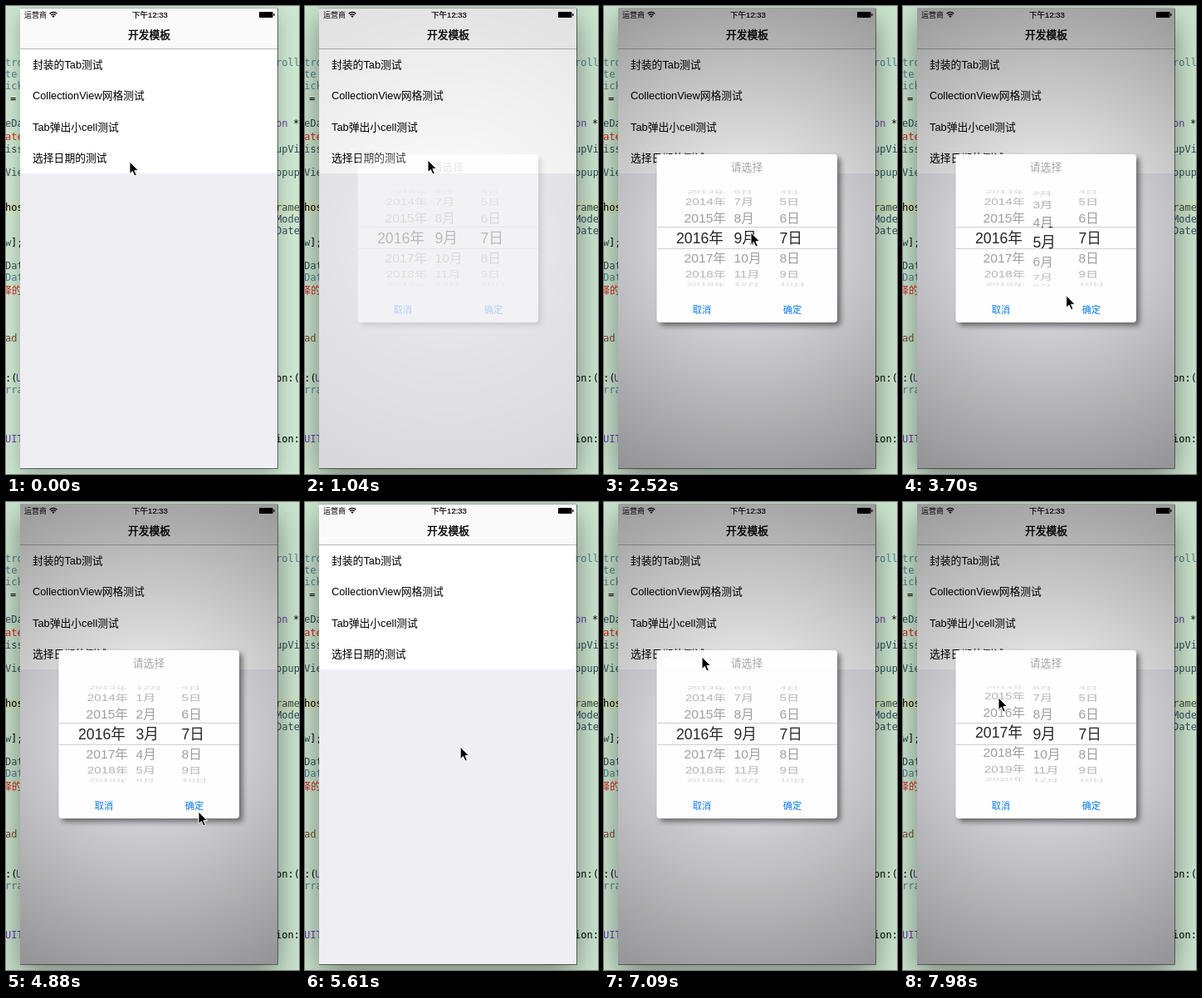
An HTML page that plays this animation: 353x562 px, repeating every 8000 ms.

```html
<!DOCTYPE html>
<html lang="zh-CN">
<head>
<meta charset="utf-8">
<title>日期选择</title>
<style>
  html, body { margin: 0; width: 100%; height: 100%; overflow: hidden; background: #cce6d0; }
  svg { display: block; width: 353px; height: 562px; }
  text { font-family: "Liberation Sans", "Noto Sans CJK SC", "Noto Sans CJK", sans-serif; white-space: pre; }
  .code text { font: 12px "DejaVu Sans Mono", "Noto Sans CJK SC", monospace; }
  .teal { fill: #4f7f88; }
  .slate { fill: #2d4d55; }
  .purple { fill: #6a3aa2; }
  .red { fill: #d8261a; }
  .brown { fill: #78492a; }
  .item { font-size: 12.8px; }
  .mid { text-anchor: middle; }
  .btn { font-size: 11.2px; fill: #0a7af0; text-anchor: middle; }
  .outer { font-size: 15.8px; }
  .lens { font-size: 17.7px; fill: #262626; }
  .idle { filter: blur(11px); }
  .active { filter: blur(18px); }
  .card { filter: drop-shadow(4px 4px 3px rgba(0, 0, 0, .48)); }
</style>
</head>
<body>
<svg viewBox="0 0 353 562">
  <defs>
    <radialGradient id="vignette" gradientUnits="userSpaceOnUse" cx="172" cy="279" r="320">
      <stop offset="0" stop-opacity="0"/>
      <stop offset="1" stop-opacity=".39"/>
    </radialGradient>
    <clipPath id="outerClip"><path d="M64 219H281V265H64ZM64 292H281V338H64Z"/></clipPath>
    <clipPath id="lensClip"><path d="M64 265H281V292H64Z"/></clipPath>
  </defs>

  <rect width="353" height="562" fill="#cce6d0"/>
  <rect y="235" width="353" height="14" fill="#d3e5bd"/>
  <g class="code">
    <g class="teal">
      <text x="-1" y="72">tro</text><text x="325" y="72">roll</text>
      <text x="-1" y="86">te</text><text x="-1" y="100">ick</text>
      <text x="-1" y="330">Dat</text><text x="-1" y="465">rra</text>
    </g>
    <g class="slate">
      <text x="-1" y="145">eDa</text>
      <text x="-1" y="176">iss</text><text x="325" y="176">upVi</text>
      <text x="-1" y="204">Vie</text><text x="325" y="204">opup</text>
      <text x="325" y="246">rame</text><text x="325" y="260">Mode</text><text x="325" y="274">Date</text>
      <text x="-1" y="288">w</text><text x="-1" y="316">Dat</text>
    </g>
    <text x="5" y="115">=</text><text x="346" y="145">*</text>
    <text x="-1" y="246">hos</text><text x="6" y="288">];</text>
    <text x="-1" y="451">:(</text><text x="325" y="451">on:(</text><text x="325" y="524">ion:</text>
    <g class="purple">
      <text x="325" y="145">on</text><text x="12" y="451">U</text><text x="-1" y="524">UIT</text>
    </g>
    <g class="red"><text x="-1" y="161">ate</text><text x="-5" y="346">择的时</text></g>
    <text class="brown" x="-1" y="403">ad</text>
  </g>

  <rect id="idle" class="idle" x="17" y="11" width="310" height="552" fill-opacity=".26"/>
  <rect id="active" class="active" x="17" y="15" width="310" height="552" fill-opacity=".44"/>

  <rect x="17" y="3" width="310" height="552" fill="#efeef3"/>
  <path d="M17 2.5H327" stroke="#000" stroke-opacity=".2"/>
  <path d="M327.5 3V555.5H17" fill="none" stroke="#000" stroke-opacity=".5"/>
  <rect x="17" y="3" width="310" height="48" fill="#fafafa"/>
  <rect x="17" y="51" width="310" height="1" fill="#b8b8ba"/>
  <rect x="17" y="52" width="310" height="149" fill="#fff"/>
  <text x="22" y="14" font-size="9">运营商</text>
  <path d="M52.6 9.2a6.2 6.2 0 0 1 8.8 0M54.3 11a3.8 3.8 0 0 1 5.4 0" fill="none" stroke="#000" stroke-width="1.3"/>
  <path d="M57 13.9l-1.6-1.7a2.3 2.3 0 0 1 3.2 0z"/>
  <text class="mid" x="173.5" y="14.2" font-size="9.5" stroke="#000" stroke-width=".2">下午12:33</text>
  <rect x="305" y="7" width="16.5" height="7" rx="1"/>
  <rect x="322.2" y="9" width="1.3" height="3" rx=".6"/>
  <text class="item mid" x="172.5" y="39.3" stroke="#000" stroke-width=".4">开发模板</text>
  <g class="item">
    <text x="32" y="74.5">封装的Tab测试</text>
    <text x="32" y="112">CollectionView网格测试</text>
    <text x="32" y="149.5">Tab弹出小cell测试</text>
    <text x="32" y="187">选择日期的测试</text>
  </g>

  <g id="popup">
    <rect x="17" y="3" width="310" height="552" fill="url(#vignette)"/>
    <rect class="card" x="63.5" y="178" width="217.5" height="202" rx="4" fill="#fefefe"/>
    <text class="item mid" x="172" y="198" fill="#a6a6a6">请选择</text>
    <path d="M64 265.5H281M64 291.5H281" stroke="#cfcfcf"/>
    <g id="outer" class="outer" clip-path="url(#outerClip)"></g>
    <g id="lens" class="lens" clip-path="url(#lensClip)"></g>
    <text class="btn" x="118" y="369.4">取消</text>
    <text class="btn" x="227" y="369.4">确定</text>
  </g>

  <path id="cursor" d="M0 0V14.6L3.4 11.5 5.8 17 8.3 15.9 5.9 10.6H10.6Z" stroke="#fff" stroke-linejoin="round"/>
</svg>
<script>
  const LOOP = 8000, TICK = 147.6;
  const CENTER = 278.5, RADIUS = 58.5, ROW_ANGLE = 24 * Math.PI / 180;
  const $ = id => document.getElementById(id);

  // Smooth 0 to 1 between two ticks
  function ramp(k, from, to) {
    const f = Math.min(1, Math.max(0, (k - from) / (to - from)));
    return f * f * (3 - 2 * f);
  }

  // Cursor gestures: start tick, end tick, destination
  const gestures = [
    [1, 4, 148, 185],     // to the last row
    [10, 15, 187, 360],
    [15, 17, 177, 272],   // onto the month wheel
    [18, 22, 187, 341],   // drag down
    [22, 32, 232, 372],   // to confirm
    [35, 42, 118, 174],   // back to the row
    [42, 43, 118, 180],
    [46, 48, 118, 186],
    [48, 52, 115, 261],   // onto the year wheel
    [52, 54, 115, 235]    // drag up
  ];

  function cursorAt(k) {
    let x = 149, y = 187;
    for (const [from, to, toX, toY] of gestures) {
      const f = ramp(k, from, to);
      x += (toX - x) * f;
      y += (toY - y) * f;
    }
    return [x, y];
  }

  function addText(parent, dy, anchor) {
    const el = document.createElementNS('http://www.w3.org/2000/svg', 'text');
    el.setAttribute('y', dy);
    el.setAttribute('text-anchor', anchor);
    return parent.appendChild(el);
  }

  function makeWheel(outerX, anchor, lensX, label) {
    const rows = [];
    for (let step = -4; step <= 4; step++) {
      rows.push({ step, far: addText($('outer'), 5.8, anchor), near: addText($('lens'), 6.5, 'start') });
    }
    return value => {
      const base = Math.round(value);
      for (const { step, far, near } of rows) {
        const angle = (base + step - value) * ROW_ANGLE;
        const cos = Math.max(0, Math.cos(angle));
        const y = CENTER + RADIUS * Math.sin(angle);
        far.textContent = near.textContent = label(base + step);
        far.setAttribute('transform', `translate(${outerX} ${y}) scale(${.9 + .1 * cos} ${cos})`);
        far.setAttribute('fill-opacity', .06 + .35 * cos);
        near.setAttribute('transform', `translate(${lensX} ${y}) scale(1 ${cos})`);
      }
    };
  }

  const setYear = makeWheel(147, 'end', 87, n => n + '年');
  const setMonth = makeWheel(156.5, 'start', 156.5, n => (n + 11) % 12 + 1 + '月');
  const setDay = makeWheel(211.5, 'start', 211.5, n => n + '日');
  setDay(7);

  function draw(k) {
    const focus = ramp(k, 1, 4);
    const [x, y] = cursorAt(k);
    $('idle').setAttribute('opacity', 1 - focus);
    $('active').setAttribute('opacity', focus);
    $('popup').setAttribute('opacity', ramp(k, 6.2, 8.6) - ramp(k, 34, 37) + ramp(k, 46, 48.2));
    $('cursor').setAttribute('transform', `translate(${x} ${y})`);
    setYear(2016 + 1.08 * ramp(k, 52, 54));
    setMonth(k < 40 ? 9 - 6 * ramp(k, 18, 29) : 9);   // reopening starts afresh
  }

  const start = performance.now();
  let shown = -1;
  function tick() {
    const k = Math.floor((performance.now() - start) % LOOP / TICK);
    if (k !== shown) draw(shown = k);
    requestAnimationFrame(tick);
  }
  tick();
</script>
</body>
</html>
```
